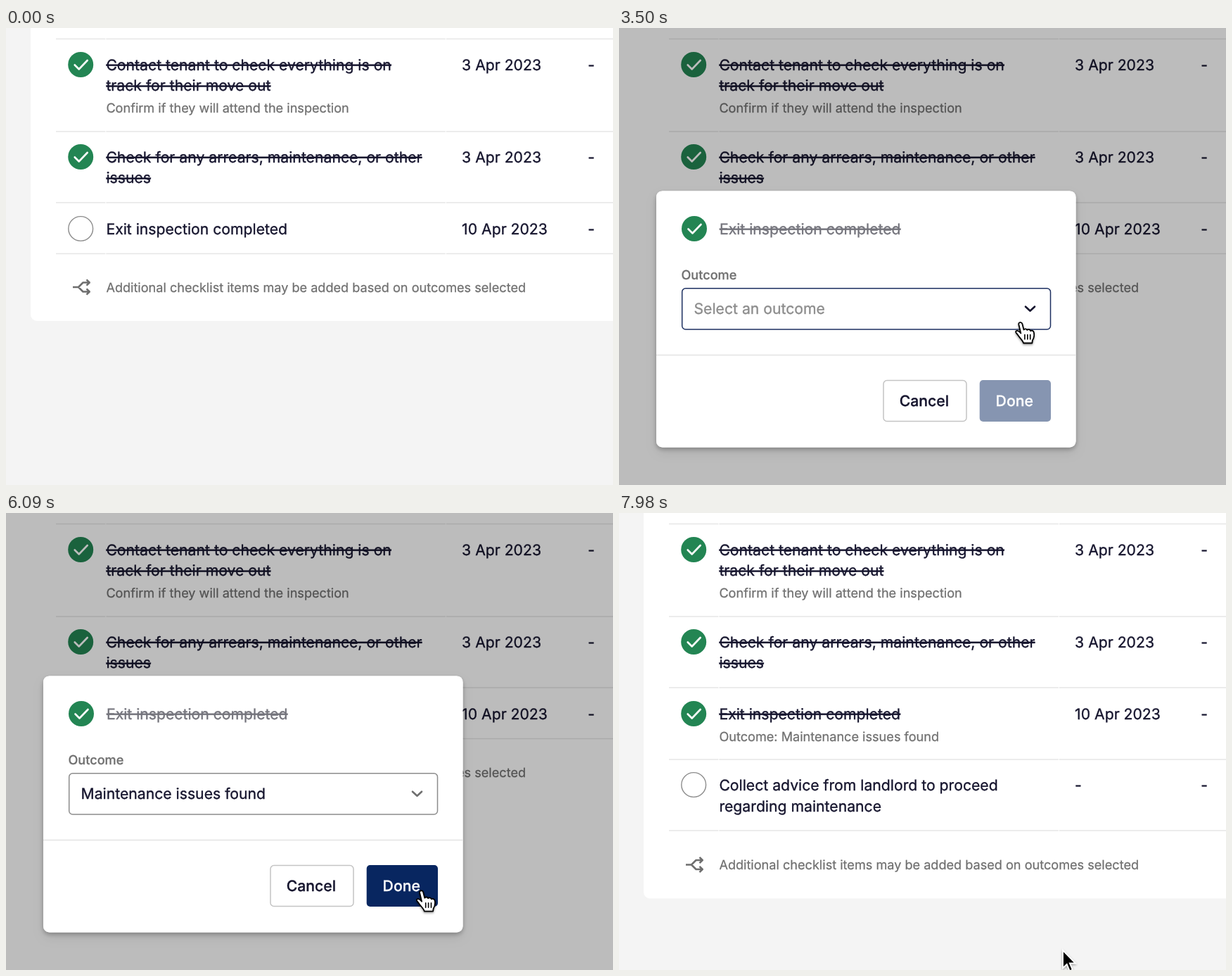
An HTML page for the animation above (8000 ms loop, 863x649 px).

```html
<!DOCTYPE html>
<html lang="en">
<head>
<meta charset="utf-8">
<title>Checklist</title>
<style>
  html, body { margin: 0; width: 100%; height: 100%; overflow: hidden; background: #f4f4f4; }
  svg { display: block; width: 863px; height: 649px; }
  text {
    font: 400 21.2px Inter, sans-serif; fill: #16152e; stroke: #16152e; stroke-width: .35;
    text-rendering: geometricPrecision; white-space: pre;
  }
  .sub { font-size: 18.13px; fill: #6f6f6f; stroke: #6f6f6f; stroke-width: .25; }
  .label { font-size: 18.1px; font-weight: 500; fill: #6f6f6f; stroke: #6f6f6f; stroke-width: .25; }
  .hint { fill: #8c8c8c; stroke: #8c8c8c; }
  .muted { fill: #74747c; stroke: #74747c; }
  .btn { font-weight: 500; }
  .light { fill: #fff; stroke: #fff; }
  .strike { text-decoration: line-through; }
  .rule { stroke: #e6e6e6; stroke-width: 1.5; }
  .icon, .chevron, .ring { fill: none; }
  .icon { stroke: #6e6e6e; stroke-width: 2.5; stroke-linejoin: round; }
  .chevron { stroke-width: 2.6; stroke-linecap: round; stroke-linejoin: round; }
  .ring { stroke: #8c8c8c; stroke-width: 1.4; }
</style>
</head>
<body>
<svg id="stage" viewBox="0 0 863 649"></svg>
<script>
const LOOP = 8000, STEP = 70;
const NAVY = '#082660', GREEN = '#238553';

const text = (x, y, str, cls = '') => `<text x="${x}" y="${y}" class="${cls}">${str}</text>`;
const rule = y => `<path class="rule" d="M71 ${y}H141.3M142.3 ${y}H624.8M625.8 ${y}H863"/>`;
const tick = (x, y) => `<circle cx="${x}" cy="${y}" r="18" fill="${GREEN}"/>
  <path d="M${x - 8.5} ${y + .5}l6 6 12-12.5" fill="none" stroke="#fff" stroke-width="2.6"
    stroke-linecap="round" stroke-linejoin="round"/>`;
const ring = (y, id) => `<circle id="${id}" class="ring" cx="106.2" cy="${y}" r="17.4"/>`;
const dates = (y, date) => text(648.1, y, date) + text(827.3, y, '-');
const box = (x, y, w, h, r, attrs) => `<rect x="${x}" y="${y}" width="${w}" height="${h}" rx="${r}" ${attrs}/>`;
const modalBox = attrs => box(53, 231.5, 596.5, 364, 9, `fill="#fff" ${attrs}`);

const list = `
  <rect id="page" width="863" height="649"/>
  <rect id="card" x="35" y="-20" width="860" rx="9" fill="#fff"/>
  ${modalBox('id="backing"')}
  <g id="upper">
    ${rule(15.5)}
    ${tick(106.2, 52)}
    ${text(142.4, 59.5, 'Contact tenant to check everything is on', 'strike')}
    ${text(142.4, 89.3, 'track for their move out', 'strike')}
    ${text(142.4, 120.4, 'Confirm if they will attend the inspection', 'sub')}
    ${dates(59.5, '3 Apr 2023')}
    ${rule(147)}
    ${tick(106.2, 183)}
    ${text(142.4, 190.6, 'Check for any arrears, maintenance, or other', 'strike')}
    ${text(142.4, 220.4, 'issues', 'strike')}
    ${dates(190.6, '3 Apr 2023')}
  </g>
  ${rule(248)}
  ${ring(285, 'exitRing')}
  <g id="exitPlain">${text(142.4, 292.5, 'Exit inspection completed')}</g>
  <g id="exitDone">
    ${tick(106.2, 285)}
    ${text(142.4, 292.5, 'Exit inspection completed', 'strike')}
    ${text(142.4, 323.8, 'Outcome: Maintenance issues found', 'sub')}
  </g>
  ${dates(292.5, '10 Apr 2023')}
  <g id="exitRule">${rule(320.5)}</g>
  <g id="newRow">
    ${ring(386, 'newRing')}
    ${text(142.4, 393.5, 'Collect advice from landlord to proceed')}
    ${text(142.4, 423.5, 'regarding maintenance')}
    ${dates(393.5, '-')}
  </g>
  <g id="newRule">${rule(451)}</g>
  <g id="note">
    <path class="icon" d="M95 368h8l6.5-6.5h9M103 368l6.5 6.5h9M114.5 357.3l4.2 4.2-4.2 4.2M114.5 370.3l4.2 4.2-4.2 4.2"/>
    ${text(142.4, 374.8, 'Additional checklist items may be added based on outcomes selected', 'sub')}
  </g>`;

const dialog = `
  <path id="shade" fill-rule="evenodd" d="M0 0H863V649H0ZM62 231.5H640.5q9 0 9 9V586.5q0 9-9 9H62q-9 0-9-9V240.5q0-9 9-9Z"/>
  <g id="modal">
    ${modalBox('filter="url(#modalShadow)"')}
    ${tick(107, 285)}
    ${text(142.9, 292.5, 'Exit inspection completed', 'strike muted')}
    ${text(88.5, 357, 'Outcome', 'label')}
    ${box(89.7, 369.7, 523.8, 58.3, 5, 'id="select" fill="none" stroke-width="1.5"')}
    <g id="placeholder">${text(106.5, 406.3, 'Select an outcome', 'hint')}</g>
    <g id="value">${text(106.5, 406.3, 'Maintenance issues found')}</g>
    <path id="chevron" class="chevron" d="M578 395.7l6.5 6 6.5-6"/>
    <path d="M53 464.5H649.5" stroke="#e3e3e3" stroke-width="1.4"/>
    ${box(376, 500.5, 118, 58, 5, 'fill="none" stroke="#c4c4c4" stroke-width="1.5"')}
    ${text(398.7, 537.3, 'Cancel', 'btn')}
    ${box(512.7, 500, 101.3, 59, 5, `id="done" fill="${NAVY}"`)}
    ${text(535.6, 537.3, 'Done', 'btn light')}
    <g id="menu">
      ${box(88.3, 368, 527, 195, 6, 'fill="none" stroke="#c3d0f2" stroke-width="3"')}
      ${box(90, 370, 523.5, 190.5, 5, 'fill="#fff" stroke="#173a78" stroke-width="2"')}
      <path d="M90 428H613.5" stroke="#173a78" stroke-width="1.6"/>
      ${text(106.5, 406.3, 'Select an outcome', 'hint')}
      <path class="chevron" stroke="#16152e" d="M578 402l6.5-6 6.5 6"/>
      ${box(96.5, 0, 510, 53, 5, 'id="highlight" fill="#e6ebfa"')}
      ${text(108, 469, 'No maintenance issues found')}
      ${text(108, 534.5, 'Maintenance issues found')}
    </g>
  </g>`;

const pointer = `
  <g id="cursor" filter="url(#cursorShadow)">
    <path id="arrow" stroke="#fff" stroke-width="1.8" d="M0 0V25.2L5.7 19.8 9.7 29.4 13.8 27.7 9.8 18.3H17.8Z"/>
    <g id="hand" stroke="#000" stroke-width="1.8" stroke-linejoin="round" stroke-linecap="round">
      <path fill="#fff" d="M-2.2 4.5C-2.8 1.2 1.8.4 2.8 3.6L5 12C6.2 10.2 9 10.5 9.8 12.5 11 11 14 11.5 14.6 13.7
        16 12.5 19 13.3 19.4 16 20.2 20 19 24.5 17.4 27L16.8 31H4.6C3.6 27-1 23.4-3.4 19.6-5 17.2-7.6 15.6-6 14
        -4.4 12.4-1.5 14 .8 17Z"/>
      <path fill="none" stroke-width="1.6" d="M6.4 19v6.5M10.3 19v6.5M14.2 19v6.5"/>
    </g>
  </g>`;

const stage = document.getElementById('stage');
stage.innerHTML = `<defs>
  <filter id="modalShadow" x="-10%" y="-10%" width="120%" height="125%">
    <feDropShadow dx="0" dy="3" stdDeviation="3" flood-opacity=".26"/>
    <feDropShadow dx="0" dy="7" stdDeviation="8" flood-opacity=".08"/>
  </filter>
  <filter id="cursorShadow" x="-30%" y="-30%" width="160%" height="160%">
    <feDropShadow dx="0" dy="1.6" stdDeviation="1.4" flood-opacity=".4"/>
  </filter></defs>${list}${dialog}${pointer}`;

const parts = {};
stage.querySelectorAll('[id]').forEach(el => parts[el.id] = el);
const set = (id, attrs) => Object.entries(attrs).forEach(([k, v]) => parts[id].setAttribute(k, v));
const fade = (id, opacity) => set(id, { opacity });
const shift = (id, x, y) => set(id, { transform: `translate(${x} ${y})` });

const clamp = v => Math.min(1, Math.max(0, v));
const span = (t, start, length) => clamp((t - start) / length);
const easeIn = u => u * u;
const easeOut = u => 1 - (1 - u) ** 2;
const easeInOut = u => u * u * (3 - 2 * u);

// [start, duration, x, y, easing]: each move begins where the last one ended
const moves = [
  [910, 840, 108.5, 288, easeOut],
  [2380, 770, 499, 417, easeInOut],
  [3220, 280, 570.5, 416.5, easeInOut],
  [4060, 630, 566.5, 516.5, easeInOut],
  [5600, 770, 600.5, 542.5, easeInOut],
  [7560, 420, 631, 621, easeIn],
];

function cursorAt(t) {
  let x = 870, y = 295;
  for (const [start, length, toX, toY, ease] of moves) {
    const u = ease(span(t, start, length));
    x += (toX - x) * u;
    y += (toY - y) * u;
  }
  return [x, y];
}

function render(t) {
  const [x, y] = cursorAt(t);
  const opened = easeOut(span(t, 1960, 350));
  const closed = easeOut(span(t, 6790, 350));
  const shown = opened * (1 - closed);
  const chosen = easeOut(span(t, 4830, 350));
  const menu = easeOut(span(t, 3570, 280)) * (1 - chosen);

  const onRing = t < 2030 && Math.hypot(x - 106, y - 285) < 19;
  const onSelect = t > 2380 && t < 4830 && x > 89 && y > 369;
  const onDone = t >= 5670 && t < 6790;

  set('page', { fill: shown > .9 ? '#fff' : '#f4f4f4' });
  set('card', { height: 436 + 131.5 * closed });
  fade('backing', clamp(shown * 2));
  shift('upper', 0, closed > 0 && closed < .9 ? 1 : 0);
  set('exitRing', { style: onRing ? 'stroke:#1c2850;stroke-width:1.6' : '' });
  fade('exitRing', 1 - closed);
  fade('exitPlain', closed < 1 ? 1 : 0);
  fade('exitDone', closed);
  shift('exitRule', 0, 29.5 * closed);
  fade('newRow', span(closed, .4, .6));
  fade('newRule', closed);
  shift('note', 0, 131.5 * closed);

  fade('shade', .263 * shown);
  fade('modal', shown);
  set('select', { stroke: onSelect ? '#1c2f60' : '#8c8c8c' });
  set('chevron', { stroke: onSelect ? '#16152e' : '#6f6f6f' });
  fade('placeholder', 1 - chosen);
  fade('value', chosen);
  set('done', { 'fill-opacity': .485 + .515 * chosen });
  fade('menu', menu);
  set('highlight', { y: y > 495 ? 500.5 : 435, opacity: y > 431 ? 1 : 0 });

  const pointing = onRing || onSelect || onDone;
  shift('cursor', x, y);
  fade('arrow', pointing ? 0 : 1);
  fade('hand', pointing ? 1 : 0);
}

const start = performance.now();
function tickFrame() {
  const t = (performance.now() - start) % LOOP;
  render(Math.floor(t / STEP) * STEP);
  requestAnimationFrame(tickFrame);
}
tickFrame();
</script>
</body>
</html>
```
